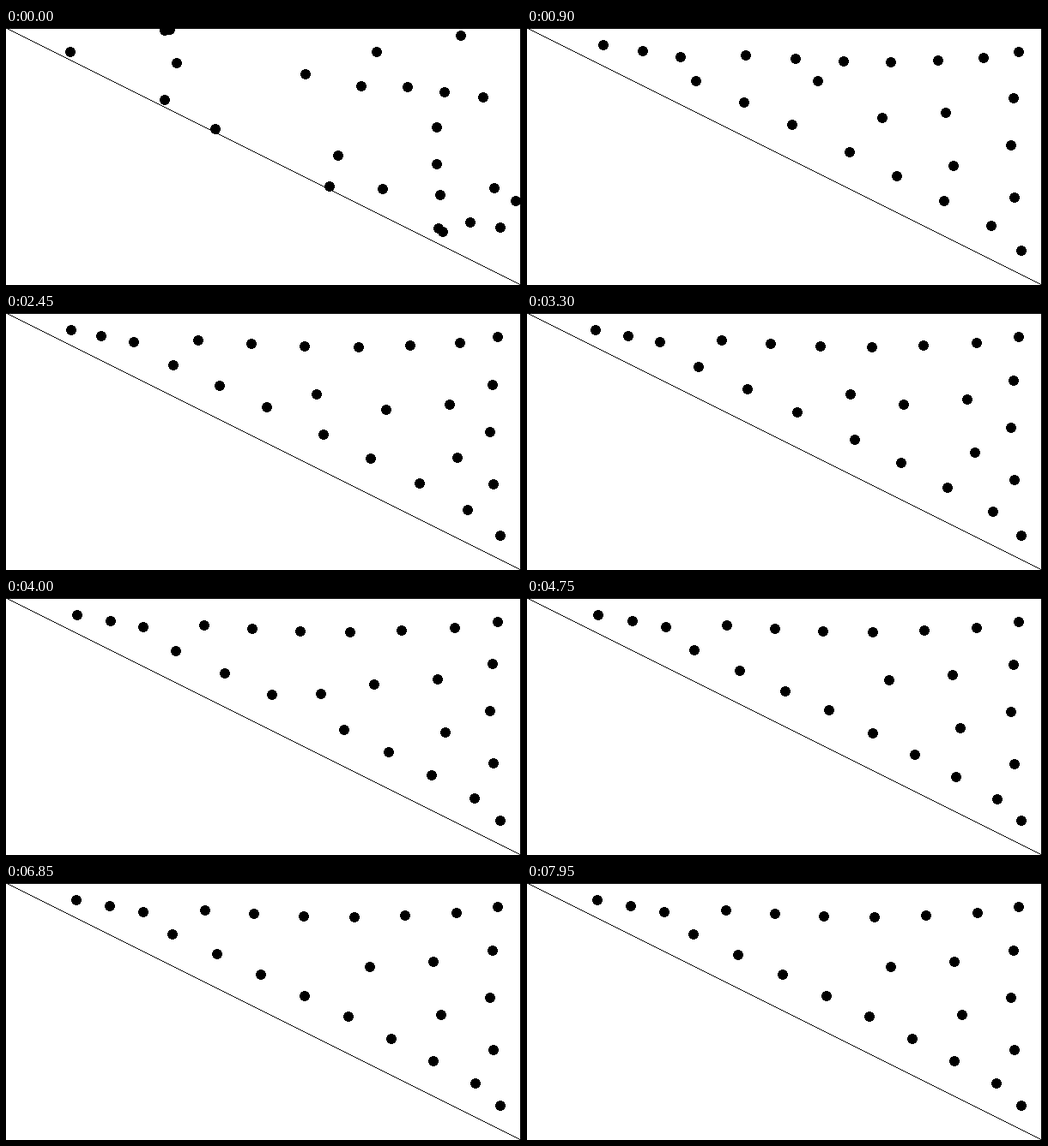
A matplotlib script for the animation above (8 s loop, 600x300 px).

```python
import numpy as np
import matplotlib.pyplot as plt
from matplotlib.animation import FuncAnimation

W, H, DPI = 600, 300, 100
STEP, LOOP = 50, 8000
RADIUS = 6
LAUNCH = 900                # the scattered dots have spread out by then
FALL = (3300, 4750)         # one dot drops into the gap in the slope row
DECAY, PERIOD = 1500, 5000  # of the slow swing while settling

# Scattered start, row by row: nose, top, right, slope, inside
START = np.array([
    (75, 28), (185, 3), (185, 84),
    (191, 2), (349, 54), (432, 28), (468, 69), (511, 75), (530, 9),
    (556, 81), (502, 116), (569, 187), (594, 202), (576, 233),
    (199, 41), (244, 118), (377, 185), (414, 68),
    (439, 188), (504, 234), (509, 238), (541, 227),
    (387, 149), (502, 159), (506, 195)], float)
TOP, RIGHT, SLOPE, INSIDE = (slice(0, 9), slice(10, 13),
                             slice(14, 22), slice(22, 25))
JOINER = 17


def row(a, b, n, bulge=(0, 0)):
    """n evenly spaced points from a to b, bent like half a sine wave."""
    u = np.linspace(0, 1, n)[:, None]
    return (1 - u) * np.array(a) + u * np.array(b) + np.sin(np.pi * u) * bulge


REST = np.vstack([
    row((82, 20), (160, 34), 3),
    row((232, 32), (525, 35), 6, (-3, 6)),
    row((573, 28), (576, 260), 5, (-10, -10)),
    row((194, 60), (547, 234), 8, (4, -3)),
    [(424, 98), (498, 92), (507, 154)]])

# Shapes of the sideways waves in the two long rows
top_u = np.arange(1, 10) / 10
top_wave = np.sin(np.pi * top_u)
top_wave2 = np.sin(2 * np.pi * top_u)
slot = np.arange(1, 9)
slope_wave = np.sin(np.pi * slot / 9)
crowding = np.select([slot < 4, slot > 4], [slot / 4, (slot - 9) / 5])


def settle(now):
    """Positions as the dots swing to rest."""
    s = max(now - LAUNCH, 0)
    fade, turn = np.exp(-s / DECAY), 2 * np.pi * s / PERIOD
    c, d = fade * np.cos(turn), fade * np.sin(turn)
    u = np.clip((now - FALL[0]) / (FALL[1] - FALL[0]), 0, 1)
    gap = 1 - u * u * (3 - 2 * u)

    p = REST.copy()
    p[TOP, 0] += 24 * c * top_wave - 26 * d * top_wave2
    p[RIGHT, 1] += 3 * c + 16 * d
    along = 22 * gap * crowding - (6 * c + 40 * d) * slope_wave
    p[SLOPE] += along[:, None] * (1, 0.5)
    p[JOINER] += (22 * gap - 26 * c, -42 * gap - 25 * c + 25 * d)
    p[INSIDE] += (10 * gap - 20 * c + 20 * d, 8 * gap - c + 20 * d)
    return p


def positions(now):
    left = (1 - min(now / LAUNCH, 1)) ** 3
    return left * START + (1 - left) * settle(now)


# Hard-edged black on white, one cell per pixel
xs = np.arange(W)
px, py = xs + 0.5, np.arange(H)[:, None] + 0.5
border = np.zeros((H, W), bool)
border[0, :] = border[:, -1] = True
border[np.rint(xs * (H - 1) / (W - 1)).astype(int), xs] = True


def picture(now):
    ink = border.copy()
    for x, y in np.rint(positions(now)):
        ink |= (px - x) ** 2 + (py - y) ** 2 <= RADIUS ** 2
    return ink


fig = plt.figure(figsize=(W / DPI, H / DPI), dpi=DPI, facecolor="white")
ax = fig.add_axes([0, 0, 1, 1])
ax.axis("off")
image = ax.imshow(picture(0), cmap="gray_r", vmin=0, vmax=1,
                  aspect="auto", interpolation="nearest")


def draw(frame):
    image.set_data(picture(frame * STEP))
    return image,


anim = FuncAnimation(fig, draw, frames=LOOP // STEP, interval=STEP,
                     repeat=True, repeat_delay=0, blit=False)
plt.show()
```
